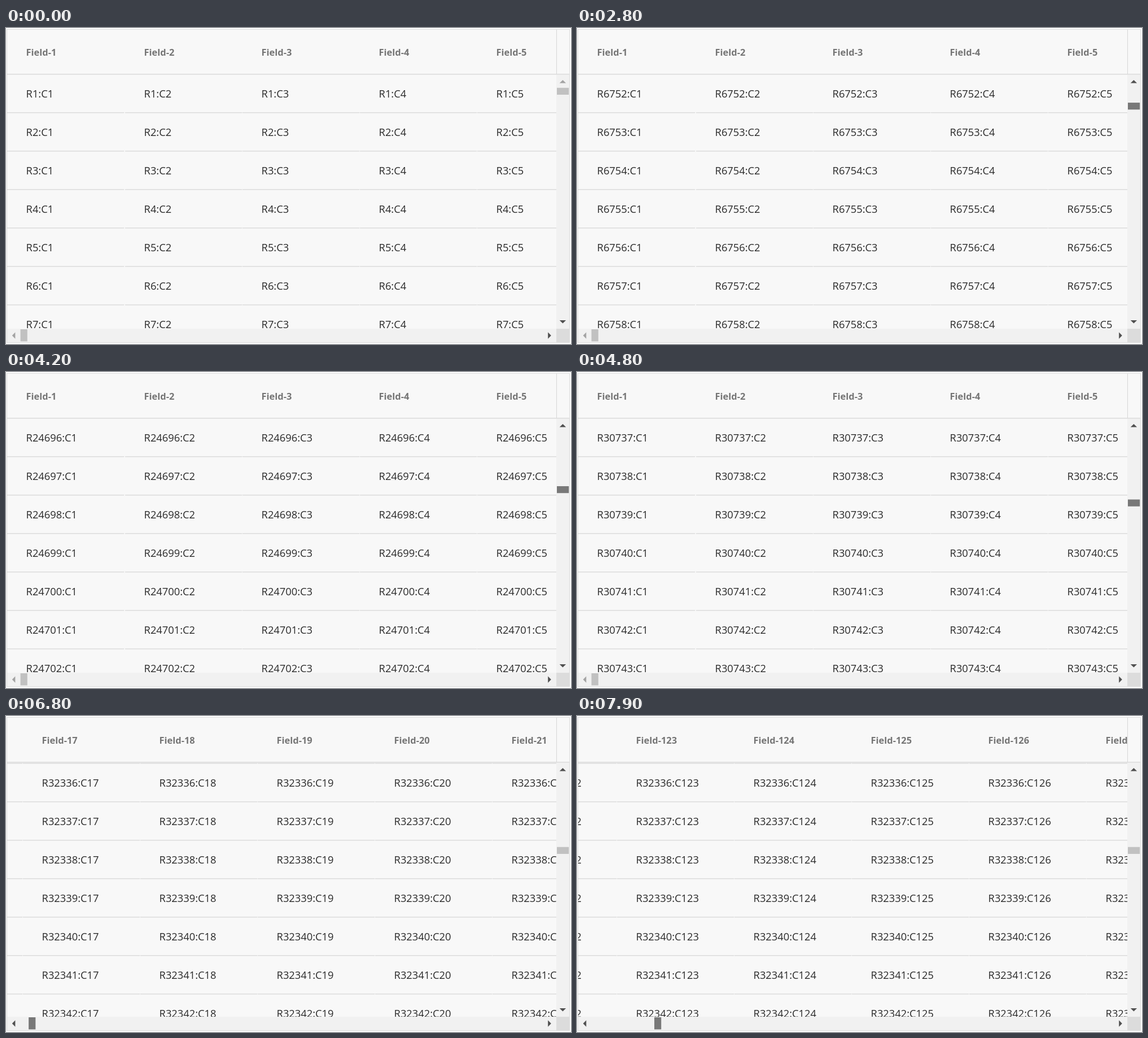
These frames come from a looping animation (1001 px wide and 559 px high, 8000 ms). An HTML page:

```html
<!DOCTYPE html>
<html lang="en">
<head>
<meta charset="utf-8">
<title>Scrolling data grid</title>
<style>
  html, body { margin: 0; width: 100%; height: 100%; overflow: hidden; background: #fff; }
  #stage { position: relative; width: 1001px; height: 559px; overflow: hidden;
    font: 18.3px/68px "Open Sans", "Noto Sans", sans-serif; color: #2a2a2a; }
  #stage div { position: absolute; box-sizing: border-box; white-space: nowrap; }
  #frame { left: 1px; top: 2px; width: 998px; height: 555px; background: #f8f8f8; border: 1px solid #dadada; }
  #head { left: 2px; top: 3px; width: 973px; height: 78px; overflow: hidden;
    font-size: 16.4px; font-weight: 700; line-height: 80px; color: #757575; }
  #rule { left: 2px; top: 81px; width: 996px; height: 2px; background: linear-gradient(#dadada 50%, #e9e9e9 50%); }
  #split { left: 975px; top: 3px; width: 1px; height: 79px; background: #d6d6d6; }
  #body { left: 2px; top: 83px; width: 973px; height: 449px; overflow: hidden; }
  .cell { width: 208px; height: 69px; padding-left: 33.6px; }
  #body .cell { border-right: 1px solid #f8f8f899;
    background: linear-gradient(#dcdcdc 50%, #eaeaea 50%) 0 67px / 100% 2px no-repeat border-box; }
  #vbar { left: 975px; top: 83px; width: 23px; height: 449px; background: #f1f1f1; }
  #hbar { left: 2px; top: 532px; width: 973px; height: 24px; background: #f1f1f1; }
  #corner { left: 975px; top: 532px; width: 23px; height: 24px; background: #dcdcdc; }
  svg { position: absolute; left: 0; top: 0; fill: #505050; }
</style>
</head>
<body>
<div id="stage">
  <div id="frame"></div>
  <div id="head"></div>
  <div id="rule"></div>
  <div id="split"></div>
  <div id="body"></div>
  <div id="vbar"></div>
  <div id="hbar"></div>
  <div id="corner"></div>
  <svg width="1001" height="559">
    <rect id="vthumb" x="976" width="21.2" height="12.2"/>
    <rect id="hthumb" y="533" width="12.2" height="21.4"/>
    <path id="up" d="M980.7 97.6L986.4 92L992.1 97.6Z"/>
    <path d="M980.7 517L986.4 522.6L992.1 517Z"/>
    <path id="left" d="M16.4 538.3L10.8 544L16.4 549.7Z"/>
    <path d="M960.2 538.3L965.8 544L960.2 549.7Z"/>
  </svg>
</div>
<script>
const LOOP = 8000, STEP = 100;
const COL = 208, ROW = 68, COLS = 6, ROWS = 8;
const ROWS_PER_PX = 177.665, SCROLL_PER_PX = 157.19, THUMB_PER_PX = 0.692;
const IDLE = '#c1c1c1', HOVER = '#a8a8a8', ACTIVE = '#787878';
const DARK = '#505050', FADED = '#a3a3a3';

// Pointer drag distance: [time, pixels]
const DRAG_Y = [[2000, 0], [2100, 1], [3500, 91], [4800, 173], [5100, 182]];
const DRAG_X = [[6500, 0], [6800, 21], [7400, 83], [7900, 161]];

const $ = id => document.getElementById(id);
const addCell = parent => parent.appendChild(Object.assign(document.createElement('div'), { className: 'cell' }));
const heads = Array.from({ length: COLS }, () => addCell($('head')));
const cells = Array.from({ length: ROWS }, () => Array.from({ length: COLS }, () => addCell($('body'))));

const slope = (a, b) => (b[1] - a[1]) / (b[0] - a[0]);

// Tangent that keeps the curve rising without overshoot
function tangent(keys, i) {
  if (i === 0) return 0;
  const before = slope(keys[i - 1], keys[i]);
  if (i === keys.length - 1) return before / 2;
  const after = slope(keys[i], keys[i + 1]);
  return 2 * before * after / (before + after);
}

function dragAt(keys, t) {
  const last = keys.length - 1;
  if (t <= keys[0][0]) return 0;
  if (t >= keys[last][0]) return keys[last][1];
  const i = keys.findIndex(k => k[0] > t) - 1;
  const [t0, v0] = keys[i], [t1, v1] = keys[i + 1];
  const d = t1 - t0, u = (t - t0) / d, w = 1 - u;
  return Math.round(v0 * w * w * (1 + 2 * u) + v1 * u * u * (3 - 2 * u)
    + d * u * w * (tangent(keys, i) * w - tangent(keys, i + 1) * u));
}

const thumbColor = (t, hover, press, release) =>
  t < hover || t >= release ? IDLE : t < press ? HOVER : ACTIVE;

function place(el, x, y, text) {
  el.style.transform = `translate(${x}px, ${y}px)`;
  if (el.textContent !== text) el.textContent = text;
}

function draw(t) {
  const dy = dragAt(DRAG_Y, t), dx = dragAt(DRAG_X, t);
  const first = 1 + Math.floor(dy * ROWS_PER_PX);
  const scroll = Math.round(dx * SCROLL_PER_PX);
  const shift = dx > 0 ? 2 : 0;
  const col0 = Math.floor(scroll / COL);

  for (let i = 0; i < COLS; i++) {
    const c = col0 + i;
    const x = c * COL - scroll + (c ? 1 : 0);
    place(heads[i], x, 0, `Field-${c + 1}`);
    cells.forEach((line, r) =>
      place(line[i], x, (r - 1) * ROW - 1 + shift, `R${first + r - 1}:C${c + 1}`));
  }

  $('vthumb').setAttribute('y', 105.8 + dy * THUMB_PER_PX);
  $('hthumb').setAttribute('x', 25.6 + dx * THUMB_PER_PX);
  $('vthumb').style.fill = thumbColor(t, 1000, 1600, 5400);
  $('hthumb').style.fill = thumbColor(t, 6100, 6400, LOOP);
  $('up').style.fill = dy ? DARK : FADED;
  $('left').style.fill = dx ? DARK : FADED;
}

let shown = -1;
function tick() {
  const t = Math.floor(performance.now() % LOOP / STEP) * STEP;
  if (t !== shown) draw(shown = t);
  requestAnimationFrame(tick);
}
tick();
</script>
</body>
</html>
```
